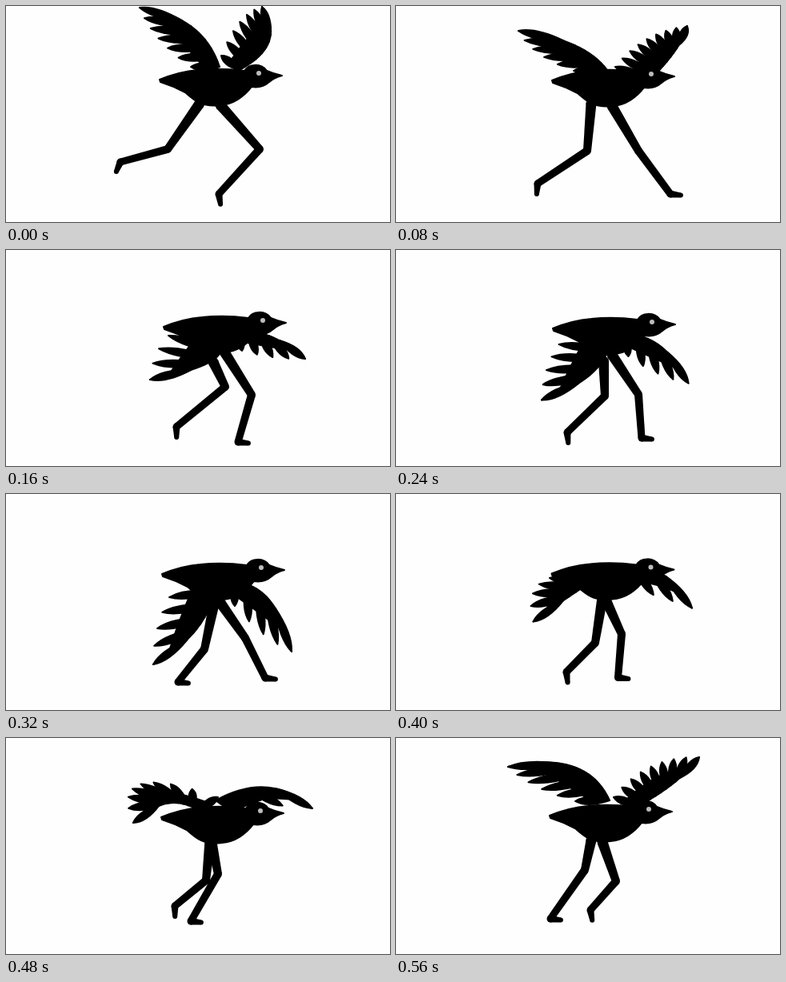
An HTML page with a canvas for the animation above (0.64 s loop, 480 by 270 pixels).

```html
<!DOCTYPE html>
<html lang="en">
<head>
<meta charset="utf-8">
<title>Running bird</title>
<style>
html, body { margin: 0; width: 100%; height: 100%; overflow: hidden; background: #fefefe; }
canvas { display: block; }
</style>
</head>
<body>
<canvas id="stage" width="480" height="270"></canvas>
<script>
const ctx = document.getElementById('stage').getContext('2d');
const STEP = 80;
const LEG_WIDTHS = [13, 10, 9, 6];
const TOE = 13;
const LIFTED = 130 * Math.PI / 180;

// wing: root, bend and tip of the leading edge, then sweep and end of the feather tips
// leg: hip, knee, ankle
const leap = {
  shift: [0, 0],
  rear: { edge: [[267, 76], [246, 12], [167, 2], [182, 42], [231, 76]], feathers: 7 },
  front: { edge: [[292, 80], [352, 48], [320, 1], [290, 8], [269, 62]], feathers: 7 },
  legs: [[[242, 122], [202, 179], [143, 195]], [[268, 124], [317, 179], [266, 235]]]
};
const land = {
  shift: [3, 1],
  rear: { edge: [[264, 80], [235, 41], [153, 31], [168, 62], [222, 81]], feathers: 6 },
  front: { edge: [[318, 92], [358, 52], [364, 25], [308, 32], [274, 76]], feathers: 9 },
  legs: [[[244, 122], [239, 181], [177, 222]], [[270, 125], [303, 181], [343, 235]]]
};
const stand = {
  shift: [5, 4],
  rear: { edge: [[268, 128], [258, 148], [180, 162], [182, 130], [203, 107]], feathers: 4 },
  front: { edge: [[290, 100], [335, 100], [374, 136], [332, 137], [295, 126]], feathers: 5 },
  legs: [[[259, 140], [274, 171], [213, 221]], [[272, 126], [307, 181], [290, 240]]]
};
const reach = {
  shift: [3, 8],
  rear: { edge: [[262, 122], [246, 180], [184, 213], [184, 165], [204, 129]], feathers: 5 },
  front: { edge: [[285, 110], [338, 112], [357, 197], [322, 182], [286, 140]], feathers: 5 },
  legs: [[[260, 138], [248, 194], [215, 235]], [[268, 136], [299, 180], [324, 230]]]
};
const lift = {
  shift: [2, 7],
  rear: { edge: [[240, 90], [200, 66], [159, 106], [125, 25], [265, 74]], feathers: 9 },
  front: { edge: [[262, 78], [330, 40], [383, 88], [345, 76], [310, 98]], feathers: 3 },
  legs: [[[255, 128], [250, 178], [211, 210]], [[257, 130], [265, 170], [231, 229]]]
};
const spread = {
  shift: [0, 5],
  rear: { edge: [[267, 78], [238, 14], [140, 36], [165, 62], [224, 79]], feathers: 6 },
  front: { edge: [[303, 85], [354, 58], [379, 24], [312, 22], [272, 74]], feathers: 9 },
  legs: [[[244, 128], [236, 165], [193, 226]], [[258, 130], [275, 179], [243, 215]]]
};

// Halfway between two values of the same structure
function between(a, b) {
  if (typeof a === 'number') return (a + b) / 2;
  if (Array.isArray(a)) return a.map((v, i) => between(v, b[i]));
  return Object.fromEntries(Object.keys(a).map(k => [k, between(a[k], b[k])]));
}

const cycle = [leap, land, stand, between(stand, reach), reach, between(reach, lift), lift, spread];

const mix = ([x, y], [u, v], t) => [x + (u - x) * t, y + (v - y) * t];
const curve = (a, b, c, t) => mix(mix(a, b, t), mix(b, c, t), t);

function paint() {
  ctx.closePath();
  ctx.fill();
  ctx.stroke();
}

function feather(base, tip, width) {
  const [x, y] = mix(base, tip, 0.65);
  const dx = tip[0] - base[0], dy = tip[1] - base[1];
  const k = width / Math.hypot(dx, dy);
  ctx.beginPath();
  ctx.moveTo(...base);
  ctx.quadraticCurveTo(x - dy * k, y + dx * k, ...tip);
  ctx.quadraticCurveTo(x + dy * k, y - dx * k, ...base);
  paint();
}

function wing({ edge: [root, bend, tip, sweep, end], feathers }) {
  const last = Math.round(feathers) - 1;
  const quills = Array.from({ length: last + 1 }, (_, i) => ({
    base: curve(root, bend, tip, 0.6 * (1 - i / last)),
    tip: curve(tip, sweep, end, i / last)
  }));
  const gap = Math.hypot(tip[0] - end[0], tip[1] - end[1]) / last;

  ctx.beginPath();
  ctx.moveTo(...root);
  ctx.quadraticCurveTo(...bend, ...tip);
  quills.forEach(q => ctx.lineTo(...mix(q.base, q.tip, 0.55)));
  paint();
  quills.forEach(q => feather(q.base, q.tip, Math.min(gap * 0.7, 9)));
}

function disc(x, y, r) {
  ctx.beginPath();
  ctx.arc(x, y, r, 0, Math.PI * 2);
  ctx.fill();
}

// A foot lies flat unless the shin is swung far back
function leg([hip, knee, ankle]) {
  const shin = Math.atan2(ankle[1] - knee[1], ankle[0] - knee[0]);
  const angle = shin < LIFTED ? 0.12 : shin - 0.9;
  const toe = [ankle[0] + TOE * Math.cos(angle), ankle[1] + TOE * Math.sin(angle)];
  const joints = [hip, knee, ankle, toe];
  joints.forEach(([x, y], i) => {
    const r = LEG_WIDTHS[i] / 2;
    disc(x, y, r);
    if (i === joints.length - 1) return;
    const [u, v] = joints[i + 1];
    const s = LEG_WIDTHS[i + 1] / 2;
    const len = Math.hypot(u - x, v - y);
    const nx = (y - v) / len, ny = (u - x) / len;
    ctx.beginPath();
    ctx.moveTo(x + nx * r, y + ny * r);
    ctx.lineTo(u + nx * s, v + ny * s);
    ctx.lineTo(u - nx * s, v - ny * s);
    ctx.lineTo(x - nx * r, y - ny * r);
    ctx.fill();
  });
}

function body() {
  ctx.beginPath();
  ctx.moveTo(192, 92);
  ctx.quadraticCurveTo(216, 82, 240, 80);
  ctx.quadraticCurveTo(268, 77, 298, 81);
  ctx.bezierCurveTo(303, 72, 319, 71, 326, 81);
  ctx.quadraticCurveTo(335, 85, 345, 87);
  ctx.quadraticCurveTo(334, 90, 329, 95);
  ctx.quadraticCurveTo(320, 103, 307, 101);
  ctx.bezierCurveTo(298, 113, 284, 123, 268, 124);
  ctx.bezierCurveTo(245, 127, 235, 118, 224, 108);
  ctx.quadraticCurveTo(209, 100, 193, 95);
  paint();
}

function draw(time) {
  const { shift, rear, front, legs } = cycle[Math.floor(time / STEP) % cycle.length];
  ctx.fillStyle = '#fefefe';
  ctx.fillRect(0, 0, 480, 270);
  ctx.fillStyle = ctx.strokeStyle = '#000';
  ctx.lineWidth = 2;
  ctx.lineJoin = 'round';
  legs.forEach(leg);
  wing(rear);
  wing(front);
  ctx.save();
  ctx.translate(...shift);
  body();
  ctx.fillStyle = '#bdbdbd';
  disc(316, 84, 3);
  ctx.restore();
}

const start = performance.now();
function tick(now) {
  draw(Math.max(0, now - start));
  requestAnimationFrame(tick);
}
tick(start);
</script>
</body>
</html>
```
